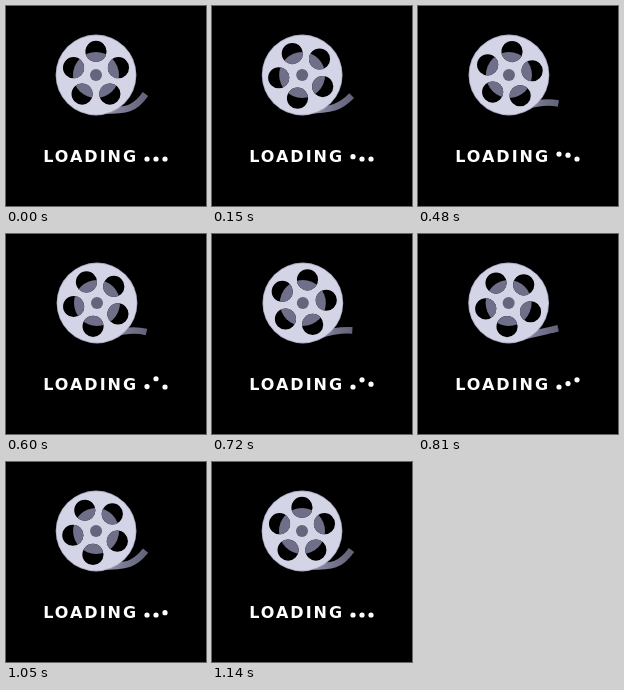
These frames come from a looping animation (200x200 px, 1.17 s). An HTML page:

```html
<!DOCTYPE html>
<html lang="en">
<head>
<meta charset="utf-8">
<title>Loading</title>
<style>
  html, body { margin: 0; width: 100%; height: 100%; overflow: hidden; background: #000; }
  svg { display: block; width: 100vw; height: 100vh; }
  text { font: bold 16px "DejaVu Sans", Inter, sans-serif; letter-spacing: 2px; fill: #fff; }
</style>
</head>
<body>
<svg viewBox="0 0 200 200">
  <defs>
    <linearGradient id="film" gradientUnits="userSpaceOnUse" x1="96" y1="0" x2="141" y2="0">
      <stop offset="0" stop-color="#9596ae"/>
      <stop offset=".6" stop-color="#74758c"/>
      <stop offset="1" stop-color="#626379"/>
    </linearGradient>
  </defs>
  <path id="tail" fill="none" stroke="url(#film)" stroke-width="6.6"/>
  <g id="reel">
    <circle r="40.4" fill="#a9a9c0"/>
    <circle r="39.6" fill="#d4d4e7"/>
    <clipPath id="windows"></clipPath>
    <g clip-path="url(#windows)">
      <circle r="40" fill="#000"/>
      <circle r="23" fill="#706f89"/>
    </g>
    <circle r="6" fill="#66657c"/>
  </g>
  <text x="37.2" y="155.8">LOADING</text>
  <g id="dots" fill="#fff"></g>
</svg>
<script>
  const LOOP = 1170, STEP = 30;
  const CYCLE = LOOP - STEP; // the last step repeats the first pose
  const HOLES = 5, HOLE_DIST = 23.6, HOLE_R = 10.6;
  const PEAKS = [345, 640, 880], RISE = [300, 300, 260], HEIGHT = 8.6;
  const get = id => document.getElementById(id);
  const mix = (a, b, p) => a + (b - a) * p;

  function circle(parent, r) {
    const c = document.createElementNS("http://www.w3.org/2000/svg", "circle");
    c.setAttribute("r", r);
    return parent.appendChild(c);
  }

  function place(c, x, y) {
    c.setAttribute("cx", x);
    c.setAttribute("cy", y);
  }

  const holes = Array.from({ length: HOLES }, () => circle(get("windows"), HOLE_R));
  const dots = PEAKS.map(() => circle(get("dots"), 2.6));

  function bounce(t, i) {
    const d = Math.min(1, Math.abs(t - PEAKS[i]) / RISE[i]);
    return HEIGHT * (1 + Math.cos(Math.PI * d)) / 2;
  }

  function draw(t) {
    const turn = 2 * Math.PI * t / CYCLE;
    const sway = (1 - Math.cos(turn)) / 2;

    get("reel").setAttribute("transform", `translate(${mix(90, 91, sway)} 69)`);
    holes.forEach((hole, i) => {
      const a = turn - Math.PI / 2 + i * 2 * Math.PI / HOLES;
      place(hole, HOLE_DIST * Math.cos(a), HOLE_DIST * Math.sin(a));
    });

    // The loose film flaps between a raised and a lowered curve.
    const x1 = mix(122, 112, sway), y1 = mix(105, 98, sway);
    const x2 = mix(129, 124, sway), y2 = mix(103, 94, sway);
    get("tail").setAttribute("d",
      `M92 104.5C${x1} ${y1} ${x2} ${y2} ${mix(139.5, 140.5, sway)} ${mix(88, 98, sway)}`);

    dots.forEach((dot, i) => place(dot, 141 + 9 * i, 153 - bounce(t, i)));
  }

  const start = performance.now();
  function tick() {
    const t = (performance.now() - start) % LOOP;
    draw(Math.floor(t / STEP) * STEP);
    requestAnimationFrame(tick);
  }
  tick();
</script>
</body>
</html>
```
